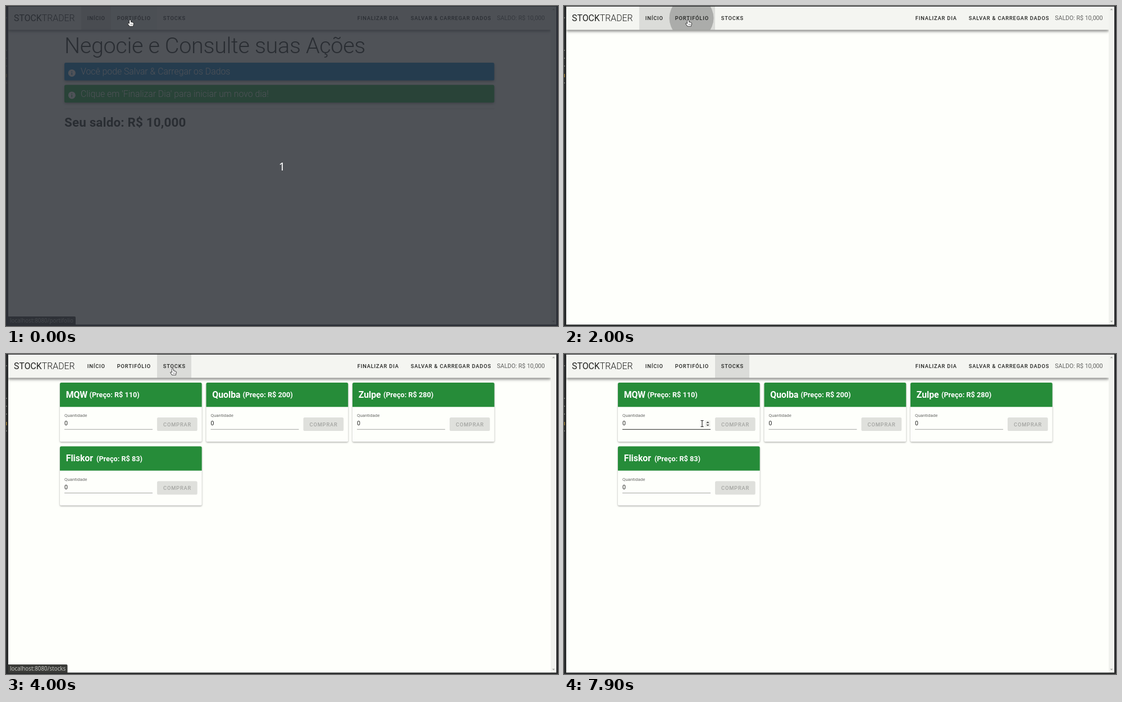
These frames come from a looping animation (983x570 px, 8000 ms). An HTML page with a canvas:

```html
<!DOCTYPE html>
<html lang="pt">
<head>
<meta charset="utf-8">
<title>Stock trader</title>
<style>
html, body { margin: 0; width: 100%; height: 100%; overflow: hidden; background: #2a2c2d; }
canvas { display: block; }
</style>
</head>
<body>
<canvas id="stage" width="983" height="570"></canvas>
<script>
const ctx = document.getElementById('stage').getContext('2d');
const LOOP = 8000, STEP = 100;
const PAGE = '#fefffb', BAR = '#f4f5f1', INK = '#20211f';
const BAR_H = 42.5;

const NAV = {
  home: { x: 134, w: 53, label: 'INÍCIO' },
  portfolio: { x: 187, w: 82, label: 'PORTIFÓLIO' },
  stocks: { x: 269, w: 61, label: 'STOCKS' },
  endDay: { x: 615, w: 95, label: 'FINALIZAR DIA' },
  save: { x: 710, w: 164, label: 'SALVAR & CARREGAR DADOS' }
};
const CARDS = [
  { x: 96, y: 51, name: 'MQW', price: 110, priceX: 52.5 },
  { x: 356.5, y: 51, name: 'Quolba', price: 200, priceX: 65 },
  { x: 617, y: 51, name: 'Zulpe', price: 280, priceX: 55 },
  { x: 96, y: 164.5, name: 'Fliskor', price: 83, priceX: 65 }
];
// Pointer stops: time, x, y
const POINTER = [
  [0, 221, 24.5], [100, 221, 25], [1100, 221, 25], [1200, 221, 24.5],
  [3000, 221, 24.5], [3100, 251, 25], [3200, 251, 25], [3300, 297, 26],
  [4900, 297, 26], [5100, 306, 29], [5200, 306, 29], [5400, 520, 33],
  [5600, 663, 34.5], [5700, 663, 34.5], [5800, 671, 28], [5900, 671, 28],
  [6300, 761, 26], [6400, 761, 26], [6800, 858, 33], [7000, 891, 32],
  [7100, 891, 32], [7500, 480, 118], [7900, 246, 124], [LOOP, 246, 124]
];
const HAND = new Path2D('M-1 1.2Q0 -.4 1 1.2V4.5Q2.5 4 3 5Q4.5 4.5 5 5.5Q6.3 5.5 6 7.5L5 11.3H-.8L-4 7Q-3.5 5.8 -1 7.2Z');
const ARROW = new Path2D('M0 0V11L2.6 8.6L4.4 12.4L6 11.6L4.3 8H8Z');
const IBEAM = new Path2D('M-2.5 -5.5H-.8L0 -5L.8 -5.5H2.5M0 -5V5M-2.5 5.5H-.8L0 5L.8 5.5H2.5');

const clamp = v => Math.min(1, Math.max(0, v));
const ramp = (t, from, to) => clamp((t - from) / (to - from));
const black = a => `rgba(0,0,0,${a})`;

// CSS "ease": cubic-bezier(.25, .1, .25, 1)
function ease(p) {
  let lo = 0, hi = 1;
  for (let i = 0; i < 20; i++) {
    const u = (lo + hi) / 2;
    const x = .75 * u * (1 - u) ** 2 + .75 * u * u * (1 - u) + u ** 3;
    if (x < p) lo = u; else hi = u;
  }
  return .3 * lo * (1 - lo) ** 2 + 3 * lo * lo * (1 - lo) + lo ** 3;
}

function pointerAt(t) {
  const i = POINTER.findIndex(stop => stop[0] > t);
  const [t0, x0, y0] = POINTER[i - 1], [t1, x1, y1] = POINTER[i];
  const p = (t - t0) / (t1 - t0);
  return { x: x0 + (x1 - x0) * p, y: y0 + (y1 - y0) * p };
}

function rect(x, y, w, h, color) {
  ctx.fillStyle = color;
  ctx.fillRect(x, y, w, h);
}

function roundRect(x, y, w, h, r, color) {
  ctx.fillStyle = color;
  ctx.beginPath();
  ctx.roundRect(x, y, w, h, r);
  ctx.fill();
}

function withShadow(blur, dy, alpha, draw) {
  ctx.save();
  ctx.shadowColor = black(alpha);
  ctx.shadowBlur = blur;
  ctx.shadowOffsetY = dy;
  draw();
  ctx.restore();
}

function text(str, x, y, size, weight, color, { spacing = 0, align = 'left', family = 'Roboto' } = {}) {
  ctx.font = `${weight} ${size}px ${family}, sans-serif`;
  ctx.letterSpacing = spacing * size + 'px';
  ctx.textAlign = align;
  ctx.fillStyle = color;
  ctx.fillText(str, x, y);
}

function triangle(x, y, size, dir, color) {
  ctx.fillStyle = color;
  ctx.beginPath();
  ctx.moveTo(x - size, y + dir * size / 2);
  ctx.lineTo(x + size, y + dir * size / 2);
  ctx.lineTo(x, y - dir * size / 2);
  ctx.fill();
}

function alertBox(y, color, message) {
  withShadow(4, 2, .4, () => roundRect(104, y, 765.5, 31.5, 2.6, color));
  ctx.fillStyle = '#fff';
  ctx.beginPath();
  ctx.arc(117.3, y + 18.4, 6.5, 0, 7);
  ctx.fill();
  rect(116.6, y + 17.6, 1.4, 4.2, color);
  rect(116.6, y + 15, 1.4, 1.4, color);
  text(message, 133, y + 21.3, 15.83, 300, '#fff');
}

function homePage() {
  text('Negocie e Consulte suas Ações', 104, 84.3, 39.56, 300, INK, { spacing: -.00833 });
  alertBox(101, '#087bc4', 'Você pode Salvar & Carregar os Dados');
  alertBox(140.5, '#1da441', "Clique em 'Finalizar Dia' para iniciar um novo dia!");
  rect(104, 182.7, 765.5, .8, '#dcddd9');
  text('Seu saldo: R$ 10,000', 104, 215, 22.42, 700, INK, { spacing: .00735 });
}

function inInput(card, p) {
  return p.x > card.x + 8 && p.x < card.x + 165 && p.y > card.y + 50 && p.y < card.y + 84;
}

function stockCard(card, pointer) {
  const { x, y } = card, hovered = inInput(card, pointer);
  withShadow(3, 1.3, .35, () => roundRect(x, y, 252.7, 105.3, 2.6, PAGE));
  roundRect(x, y, 252.7, 43.3, [2.6, 2.6, 0, 0], '#268c39');
  text(card.name, x + 10.7, y + 26.5, 15.83, 700, '#fff');
  text(`(Preço: R$ ${card.price})`, x + card.priceX, y + 26.2, 12.66, 700, '#fff');
  text('Quantidade', x + 8, y + 61.3, 7.91, 400, '#666765');
  text('0', x + 8, y + 76, 10.55, 400, INK);
  rect(x + 8, y + 82.8, 157, hovered ? 1 : .8, hovered ? '#242523' : '#8d8e8b');
  if (hovered) {
    rect(x + 155.5, y + 67.5, 9, 11.5, '#eeefeb');
    triangle(x + 160, y + 70.6, 2.6, 1, '#444');
    triangle(x + 160, y + 76, 2.6, -1, '#444');
  }
  roundRect(x + 173, y + 62, 71.7, 24, 2.6, '#dfe0dc');
  text('COMPRAR', x + 184, y + 77.5, 9.3, 500, '#a4a5a2', { spacing: .0893 });
}

// Draws a page moved up by up to 20px while it is faded out
function slide(shown, draw) {
  if (!shown) return;
  ctx.save();
  ctx.globalAlpha = shown;
  ctx.translate(0, -20 * (1 - shown));
  draw();
  ctx.restore();
}

function ripple(button, cx, radius, alpha) {
  if (!radius || !alpha) return;
  ctx.save();
  ctx.beginPath();
  ctx.rect(button.x, 0, button.w, BAR_H);
  ctx.clip();
  ctx.fillStyle = black(alpha);
  ctx.beginPath();
  ctx.arc(cx, 21.5, radius, 0, 7);
  ctx.fill();
  ctx.restore();
}

function overButton(b, p) {
  return p.y < BAR_H && p.x >= b.x && p.x < b.x + b.w;
}

function toolbar(t, pointer) {
  withShadow(5, 2, .5, () => rect(4, 0, 966, BAR_H, BAR));
  const active = {
    home: t < 2100 ? .1 : 0,
    portfolio: t < 1800 ? 0 : .1 * (1 - ramp(t, 3400, 3770)),
    stocks: t < 3400 ? 0 : .1
  };
  for (const [key, b] of Object.entries(NAV)) {
    const shade = Math.max(active[key] || 0, overButton(b, pointer) ? .035 : 0);
    if (shade) rect(b.x, 0, b.w, BAR_H, black(shade));
  }
  if (t < 2300) ripple(NAV.portfolio, 227, 50 * ramp(t, 1700, 2080), .22);
  ripple(NAV.stocks, 299.5, 45 * ramp(t, 3300, 3680), .22 * (1 - ramp(t, 3700, 4000)));

  text('STOCK', 14, 27.2, 15.83, 400, INK);
  const stockWidth = ctx.measureText('STOCK').width;
  text('TRADER', 14 + stockWidth, 27.2, 15.83, 300, INK);
  for (const b of Object.values(NAV)) {
    text(b.label, b.x + 10.8, 25, 9.3, 500, INK, { spacing: .0893 });
  }
  text('SALDO: R$ 10,000', 959.5, 25.2, 10.6, 400, '#60615f', { align: 'right' });
}

function statusBar(t) {
  const early = t < 2000;
  const shown = early ? 1 - ramp(t, 200, 500) : t < 3300 ? 0 : 1 - ramp(t, 5200, 5600);
  if (!shown) return;
  ctx.save();
  ctx.globalAlpha = shown;
  roundRect(4, 553, early ? 120 : 105.5, 15, [0, 2, 0, 0], '#3b3c39');
  text('localhost:8080/' + (early ? 'portifolio' : 'stocks'), 7, 563.6, 9.85, 400, '#c6c7c2', { family: 'Noto Sans' });
  ctx.restore();
}

function windowFrame() {
  rect(970, 1, 10, 567, '#f1f2ee');
  triangle(975, 6, 2.4, 1, '#a2a3a0');
  triangle(975, 562, 2.4, -1, '#a2a3a0');
  rect(0, 0, 983, 1, '#1f2122');
  rect(0, 0, 4, 570, '#2a2c2d');
  rect(980, 0, 3, 570, '#2a2c2d');
  rect(0, 567.5, 983, 2.5, '#2a2c2d');
  for (const y of [20, 78, 92, 106, 136]) rect(0, y, 1.5, 2, '#777975');
  rect(0, 121, 1.5, 6, '#a08035');
}

function drawPointer(p) {
  ctx.save();
  ctx.translate(p.x, p.y);
  ctx.lineJoin = 'round';
  ctx.strokeStyle = '#222';
  if (CARDS.some(card => inInput(card, p))) {
    ctx.lineWidth = 1.1;
    ctx.stroke(IBEAM);
  } else {
    const shape = Object.values(NAV).some(b => overButton(b, p)) ? HAND : ARROW;
    ctx.lineWidth = 1.5;
    ctx.stroke(shape);
    ctx.fillStyle = '#fff';
    ctx.fill(shape);
    if (shape === HAND) for (const x of [.8, 2.4, 4]) rect(x, 7, .6, 2.6, '#555');
  }
  ctx.restore();
}

function draw(t) {
  const pointer = pointerAt(t);
  rect(0, 0, 983, 570, PAGE);
  slide(1 - ease(ramp(t, 1690, 1990)) * (t >= 1690), () => t < 2000 && homePage());
  slide(t > 3652 ? ease(ramp(t, 3652, 3952)) : 0, () => CARDS.forEach(card => stockCard(card, pointer)));
  toolbar(t, pointer);
  windowFrame();
  statusBar(t);
  if (t < 100) {
    rect(0, 0, 983, 570, 'rgba(44,47,55,.83)');
    text('1', 491.5, 292.5, 20, 400, '#fff', { align: 'center', family: 'Noto Sans' });
  }
  drawPointer(pointer);
}

const start = performance.now();
function tick() {
  const t = (performance.now() - start) % LOOP;
  draw(Math.floor(t / STEP) * STEP);
  requestAnimationFrame(tick);
}
tick();
</script>
</body>
</html>
```
